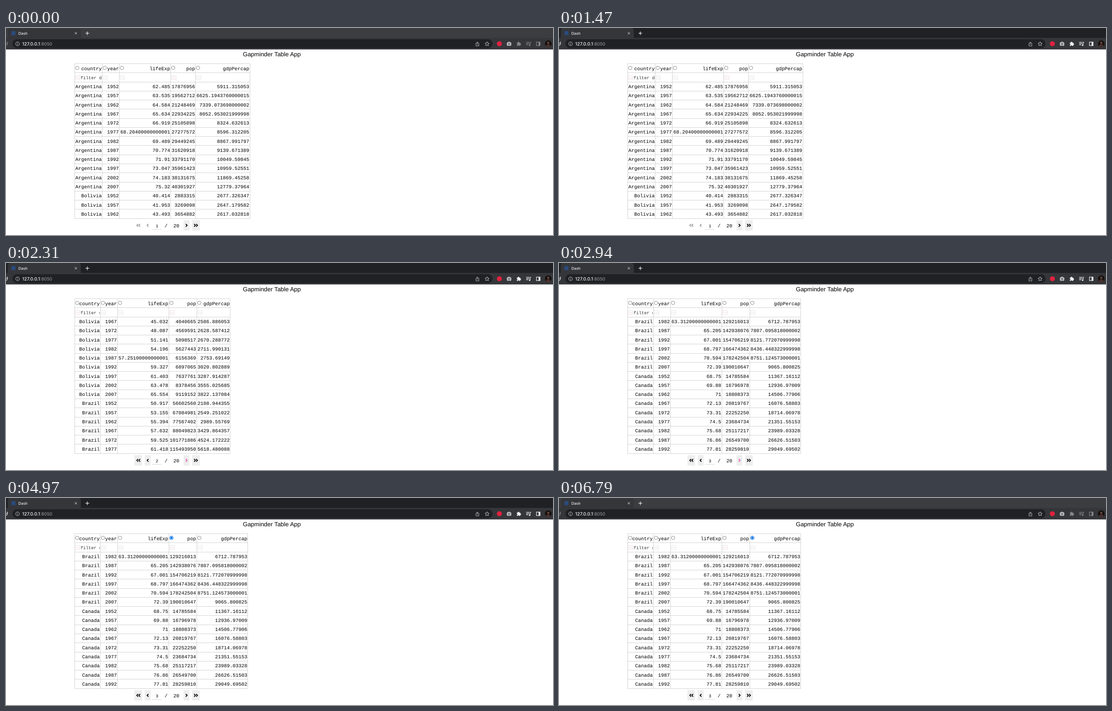
Recreate the animation shown at these times as an HTML page with a canvas. Size 1214 by 461 pixels, loop 6.86 s.

```html
<!DOCTYPE html>
<html lang="en">
<head>
<meta charset="utf-8">
<title>Table app</title>
<style>
html, body { margin: 0; width: 100%; height: 100%; overflow: hidden; background: #fff; }
canvas { display: block; }
</style>
</head>
<body>
<canvas id="stage" width="1214" height="461"></canvas>
<script>
const ctx = document.getElementById('stage').getContext('2d');
ctx.textRendering = 'geometricPrecision';

const LOOP = 6860, TICK = 70;
const MONO = '"Liberation Mono", monospace';
const SANS = '"Liberation Sans", sans-serif';
const UI = 'Inter, sans-serif';
const BLACK = [0, 0, 0], PINK = [232, 88, 176], DISABLED = [156, 156, 156];

const COLUMNS = ['country', 'year', 'lifeExp', 'pop', 'gdpPercap'];
const LEFT = 152, TOP = 79.5, ROW = 20.27, PER_PAGE = 15, YEARS = 12;
const CHAR = 6.5, FONT = CHAR / 0.6;

// Key values at these year indices; the years between are interpolated.
const KNOTS = [0, 3, 7, 11];
const COUNTRIES = [
  { name: 'Argentina', digits: 3, noisyLife: 5, noisyGdp: [1, 3],
    life: [62.485, 65.634, 70.774, 75.32],
    pop: [17876956, 22934225, 31620918, 40301927],
    gdp: [5911.315053, 8052.953021, 9139.671389, 12779.37964] },
  { name: 'Bolivia', digits: 3, noisyLife: 7,
    life: [40.414, 45.032, 57.251, 65.554],
    pop: [2883315, 4040665, 6156369, 9119152],
    gdp: [2677.326347, 2586.886053, 2753.69149, 3822.137084] },
  { name: 'Brazil', digits: 3, noisyLife: 6, noisyGdp: [7, 10],
    life: [50.917, 57.632, 65.205, 72.39],
    pop: [56602560, 88049823, 142938076, 190010647],
    gdp: [2108.944355, 3429.864357, 7807.095818, 9065.800825] },
  { name: 'Canada', digits: 2,
    life: [68.75, 72.13, 76.86, 80.65],
    pop: [14785584, 20819767, 26549700, 33390141],
    gdp: [11367.16112, 16076.58803, 26626.51503, 36319.23501] }
];
// Unrounded floating-point endings
const LIFE_TAIL = '00000000001';
const GDP_TAILS = ['000001', '0000015', '000002', '999998', '999998'];

function interpolate(values, year) {
  const k = Math.max(1, KNOTS.findIndex(knot => knot >= year));
  const p = (year - KNOTS[k - 1]) / (KNOTS[k] - KNOTS[k - 1]);
  return values[k - 1] + (values[k] - values[k - 1]) * p;
}

function makeRow(n) {
  const country = COUNTRIES[Math.floor(n / YEARS)], year = n % YEARS;
  const { name, digits, noisyLife, noisyGdp: [from, to] = [] } = country;
  const life = interpolate(country.life, year).toFixed(digits);
  const gdp = interpolate(country.gdp, year);
  return [
    name,
    String(1952 + 5 * year),
    year === noisyLife ? life + LIFE_TAIL : String(Number(life)),
    String(Math.round(interpolate(country.pop, year))),
    year >= from && year <= to
      ? gdp.toFixed(6) + GDP_TAILS[year % GDP_TAILS.length]
      : String(Number(gdp.toPrecision(10)))
  ];
}

// Columns are as wide as their longest text; headers also hold a radio button.
function makePage(page) {
  const rows = Array.from({ length: PER_PAGE }, (_, i) => makeRow(page * PER_PAGE + i));
  const edges = [LEFT];
  COLUMNS.forEach((name, col) => {
    const longest = Math.max(...rows.map(row => row[col].length));
    edges.push(edges[col] + Math.max(name.length * CHAR + 12, longest * CHAR + 3.3));
  });
  return { rows, edges };
}
const PAGES = [0, 1, 2].map(makePage);

// Radio states over time: [start, state]
const RADIO_STEPS = {
  pop: [[0, 'off'], [4060, 'hover'], [4340, 'press'], [4480, 'on'], [5740, 'off']],
  gdpPercap: [[0, 'off'], [4690, 'hover'], [4970, 'off'], [5530, 'hover'], [5600, 'press'],
    [5740, 'onHover'], [5880, 'on']]
};
const RADIO_COLORS = { off: '#767676', hover: '#4f4f4f', press: '#8d8d8d', on: '#0b72e7', onHover: '#0559b8' };

const progress = (t, start) => {
  const p = Math.min(1, Math.max(0, (t - start) / 400));
  return 1 - (1 - p) ** 2.2;
};
const mix = (a, b, p) => `rgb(${a.map((v, i) => Math.round(v + (b[i] - v) * p))})`;

function text(str, x, y, size, family, color = '#000', align = 'left', weight = 400) {
  ctx.font = `${weight} ${size}px ${family}`;
  ctx.fillStyle = color;
  ctx.textAlign = align;
  ctx.fillText(str, x, y);
}
function rect(x, y, w, h, color, radius = 0) {
  ctx.fillStyle = color;
  ctx.beginPath();
  ctx.roundRect(x, y, w, h, radius);
  ctx.fill();
}
function disc(x, y, r, color) {
  ctx.fillStyle = color;
  ctx.beginPath();
  ctx.arc(x, y, r, 0, 7);
  ctx.fill();
}
function ring(x, y, r, color, width = 1, from = 0, to = 7) {
  ctx.strokeStyle = color;
  ctx.lineWidth = width;
  ctx.beginPath();
  ctx.arc(x, y, r, from, to);
  ctx.stroke();
}
function stroke(path, color, width = 1) {
  ctx.strokeStyle = color;
  ctx.lineWidth = width;
  ctx.stroke(new Path2D(path));
}

function drawBrowser(active) {
  const bright = active ? '#f1f3f4' : '#85878a', soft = '#c9cbce';
  rect(0, 0, 1214, 23, active ? '#202124' : '#3c3d41');
  rect(0, 22, 1214, 25.7, '#35363a');
  rect(4, 0, 162, 23, '#35363a', [5, 5, 0, 0]);
  rect(12, 7, 9, 9, '#2b4a7c');
  text('Dash', 27.5, 14.5, 8.4, UI, '#e8eaed', 'left', 500);
  stroke('M152.6 9.3l4.8 4.8m0-4.8l-4.8 4.8', '#dfe1e5');
  stroke('M176.5 11.7h8m-4-4v8', '#f1f3f4', 1.2);

  rect(14, 25, 1066, 20, '#202124', 10);
  ring(-1, 35, 4, bright, 1.2, -0.2, 2.4);
  stroke('M3.3 30.5v3.5h-3.5', bright, 1.2);
  ring(25.7, 35.2, 4.2, soft);
  rect(25.2, 34.6, 1, 3, soft);
  rect(25.2, 32.6, 1, 1, soft);
  text('127.0.0.1', 36, 38.5, 10.1, UI, '#f1f3f4', 'left', 500);
  text(':8050', 75.7, 38.5, 9.8, UI, '#9aa0a6');

  stroke('M1044.7 34h-1.7v6h6.4v-6h-1.7M1046.2 37.5v-6.5m-2 2l2-2 2 2', soft, 0.9);
  stroke('M1067.7 30.6l1.4 3 3.2.4-2.4 2.2.7 3.3-2.9-1.7-2.9 1.7.7-3.3-2.4-2.2 3.2-.4z', soft);
  disc(1095, 35, 5.6, '#e0223f');

  rect(1111.7, 32, 9.6, 7.5, soft, 1.5);
  rect(1114.3, 30.8, 4.4, 2, soft, 0.7);
  disc(1116.5, 35.7, 2.4, '#35363a');
  disc(1116.5, 35.7, 1.3, soft);

  rect(1133.7, 32.5, 7.8, 7.3, bright, 0.8);
  disc(1137.5, 32, 1.5, bright);
  disc(1141.6, 36, 1.5, bright);
  disc(1133.9, 36.2, 1.2, '#35363a');
  disc(1137.5, 39.7, 1.2, '#35363a');

  stroke('M1154.5 31.8h7m-7 2.8h7m-7 2.8h4.5M1163.2 38.3v-6.5h2.3', bright, 1.2);
  disc(1162.1, 38.3, 1.6, bright);
  stroke('M1177.3 31.3h8v7.8h-8z', bright, 1.2);
  rect(1182, 31, 3.5, 8.2, bright);

  ctx.save();
  ctx.beginPath();
  ctx.arc(1203.5, 35, 7.5, 0, 7);
  ctx.clip();
  rect(1195, 27, 17, 17, '#17110f');
  disc(1203.5, 33, 2.4, '#68493f');
  disc(1203.5, 41.5, 5.4, '#49302d');
  ctx.restore();
}

function drawRadio(x, state) {
  const on = state.startsWith('on'), color = RADIO_COLORS[state];
  ring(x, 88.8, 3.9, color, on ? 1.1 : 0.85);
  if (on) disc(x, 88.8, 2.5, color);
}

function drawTable({ edges, rows }, t) {
  const lineY = i => Math.floor(TOP + i * ROW);
  const right = Math.floor(edges.at(-1)), bottom = lineY(PER_PAGE + 2);
  for (let i = 0; i <= PER_PAGE + 2; i++) rect(LEFT, lineY(i), right - LEFT + 1, 1, '#d2d2d2');
  edges.forEach(x => rect(Math.floor(x), lineY(0), 1, bottom - lineY(0), '#d2d2d2'));

  COLUMNS.forEach((name, col) => {
    const x = Math.floor(edges[col]), end = edges[col + 1] - 1.4;
    const steps = RADIO_STEPS[name] || [[0, 'off']];
    drawRadio(x + 6.1, steps.findLast(([start]) => start <= t)[1]);
    text(name, end, 93.6, FONT, MONO, '#000', 'right');

    const tint = name === 'country' || name === 'pop' ? '#efdfe2' : '#ece6e7';
    stroke(`M${x + 2.5} 105.5h10v9h-10z`, tint);
    text('Aa', x + 7.5, 112.4, 6.5, SANS, tint, 'center');
    rows.forEach((row, i) =>
      text(row[col], end, 134 + i * ROW, FONT, MONO, '#000', 'right'));
  });

  ctx.save();
  ctx.beginPath();
  ctx.rect(LEFT, 100, edges[1] - LEFT - 1.5, 20);
  ctx.clip();
  text('filter data...', 165.5, 113.8, 9.75, MONO, '#333');
  ctx.restore();
}

function chevron(x, dir, color) {
  stroke(`M${x - dir * 1.6} 436.5l${dir * 3.1} 3.1l${-dir * 3.1} 3.1`, color, 1.8);
}

function drawPager(page, t) {
  const back = mix(DISABLED, BLACK, progress(t, 2050));
  const next = mix(BLACK, PINK, progress(t, 1620) - progress(t, 3370));
  if (page > 0) {
    rect(285, 428, 17, 23, '#eee');
    rect(308, 428, 13, 23, '#eee');
  }
  rect(394, 428, 13, 23, '#eee');
  rect(413, 428, 17, 23, '#eee');
  chevron(291.7, -1, back);
  chevron(296.2, -1, back);
  chevron(314.6, -1, back);
  chevron(400.5, 1, next);
  chevron(419, 1, '#000');
  chevron(423.5, 1, '#000');
  text(page + 1, 335, 443.5, 9.4, MONO, '#000', 'center');
  rect(324, 448, 22, 1, '#d8d8d8');
  text('/', 355.3, 443.5, FONT, MONO, '#000', 'center');
  text('20', 371.5, 443.5, FONT, MONO);
}

function draw(now) {
  const t = Math.floor((now % LOOP) / TICK) * TICK;
  const page = t < 2100 ? 0 : t < 2940 ? 1 : 2;
  rect(0, 0, 1214, 461, '#fff');
  drawBrowser(t >= 1470 && t < 6790);
  text('Gapminder Table App', 590, 62.8, 13.4, SANS, '#000', 'center');
  drawTable(PAGES[page], t);
  drawPager(page, t);
}

const start = performance.now();
function frame() {
  draw(performance.now() - start);
  requestAnimationFrame(frame);
}
frame();
</script>
</body>
</html>
```
